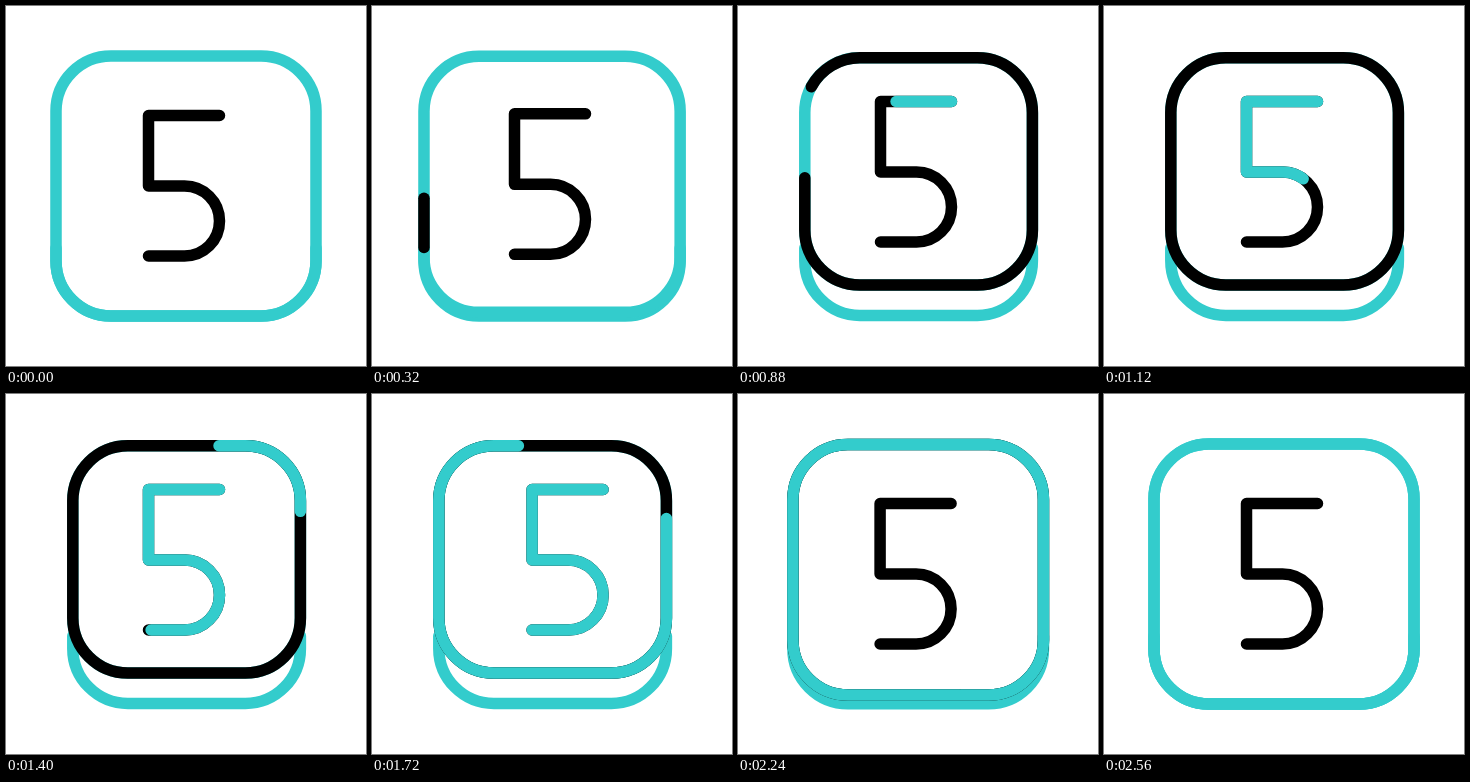
An HTML page for the animation above (2800 ms loop, 360 by 360 pixels).

```html
<!DOCTYPE html>
<html lang="en">
<head>
<meta charset="utf-8">
<title>Key 5</title>
<style>
  html, body { margin: 0; width: 100%; height: 100%; overflow: hidden; background: #fff; }
  svg { display: block; width: 100%; height: 100%; }
  path { fill: none; stroke-linecap: round; stroke-linejoin: round; stroke-width: 11.5; }
  .teal { stroke: #33cccc; }
  .black { stroke: #000; }
</style>
</head>
<body>
<svg viewBox="0 0 360 360">
  <defs>
    <clipPath id="face"><rect id="window"/></clipPath>
  </defs>
  <path id="base" class="teal"/>
  <g clip-path="url(#face)">
    <g id="leaving">
      <path class="digit black"/>
      <path id="tint" class="digit teal" pathLength="1"/>
    </g>
    <g id="entering"><path class="digit black"/></g>
  </g>
  <path id="rim" class="teal"/>
  <path id="dark" class="black" pathLength="1"/>
  <path id="light" class="teal" pathLength="1"/>
</svg>
<script>
const LOOP = 2800, STEP = 40, RADIUS = 55;
const $ = id => document.getElementById(id);
const [base, rim, dark, light, tint, leaving, entering, pane] =
  ['base', 'rim', 'dark', 'light', 'tint', 'leaving', 'entering', 'window'].map($);

const FIVE = 'M213.5 109.5H142.5V180H178.5A35 35 0 0 1 178.5 250H142.5';
document.querySelectorAll('.digit').forEach(p => p.setAttribute('d', FIVE));

const mix = (a, b, k) => a + (b - a) * k;
const span = (t, from, to) => Math.min(1, Math.max(0, (t - from) / (to - from)));
const smooth = k => k * k * (3 - 2 * k);
const ease = (t, from, to) => smooth(span(t, from, to));

// cubic-bezier(.333, 0, .2, 1): quick start, long settle
function settle(k) {
  let lo = 0, hi = 1;
  for (let i = 0; i < 24; i++) {
    const s = (lo + hi) / 2, r = 1 - s;
    const x = r * r * s + 0.6 * r * s * s + s * s * s;
    if (x < k) lo = s; else hi = s;
  }
  return smooth(lo);
}

// Clockwise ring starting at the top edge
function ring(l, t, r, b) {
  const q = RADIUS, arc = (x, y) => `A${q} ${q} 0 0 1 ${x} ${y}`;
  return `M${l + q} ${t}H${r - q}${arc(r, t + q)}V${b - q}${arc(r - q, b)}` +
    `H${l + q}${arc(l, b - q)}V${t + q}${arc(l + q, t)}Z`;
}

// Open lower edge of the key body
function body(l, r, b, y) {
  const q = RADIUS, arc = (x, y) => `A${q} ${q} 0 0 0 ${x} ${y}`;
  return `M${l} ${y}V${b - q}${arc(l + q, b)}H${r - q}${arc(r, b - q)}V${y}`;
}

function trim(path, start, length) {
  path.style.visibility = length > 0.0005 ? 'visible' : 'hidden';
  path.style.strokeDasharray = length >= 0.9995 ? 'none' : `${length} ${1 - length}`;
  path.style.strokeDashoffset = -(start % 1);
}

const move = (g, x, y) => g.setAttribute('transform', `translate(${x} ${y})`);

function draw(t) {
  const lift = ease(t, 200, 760) - ease(t, 1880, 2440);
  const l = mix(50, 66.8, lift), r = mix(310, 294.4, lift);
  const top = mix(50, 51.8, lift), bottom = mix(310, 279, lift);

  const outline = ring(l, top, r, bottom);
  [rim, dark, light].forEach(p => p.setAttribute('d', outline));
  base.setAttribute('d', body(l, r, mix(310, 309.4, lift), 242));
  const box = { x: l, y: top, width: r - l, height: bottom - top, rx: RADIUS };
  for (const k in box) pane.setAttribute(k, box[k]);

  const ink = ease(t, 200, 1060);
  trim(dark, 0.75 + 0.2 * ink, t < 2320 ? ink : 0);
  trim(light, 0.012 + 0.0005 * Math.max(0, t - 1200), settle(span(t, 1200, 2300)));

  const slide = ease(t, 1610, 2256);
  trim(tint, 0, ease(t, 680, 1440));
  move(leaving, 228 * slide, -14 * ease(t, 200, 760));
  move(entering, 228 * (slide - 1), 0);
  leaving.style.visibility = slide < 1 ? 'visible' : 'hidden';
  if (slide === 1) tint.style.visibility = 'hidden';
  entering.style.visibility = slide > 0 ? 'visible' : 'hidden';
}

const begin = performance.now();
function tick() {
  const t = (performance.now() - begin) % LOOP;
  draw(Math.floor(t / STEP) * STEP);
  requestAnimationFrame(tick);
}
tick();
</script>
</body>
</html>
```
